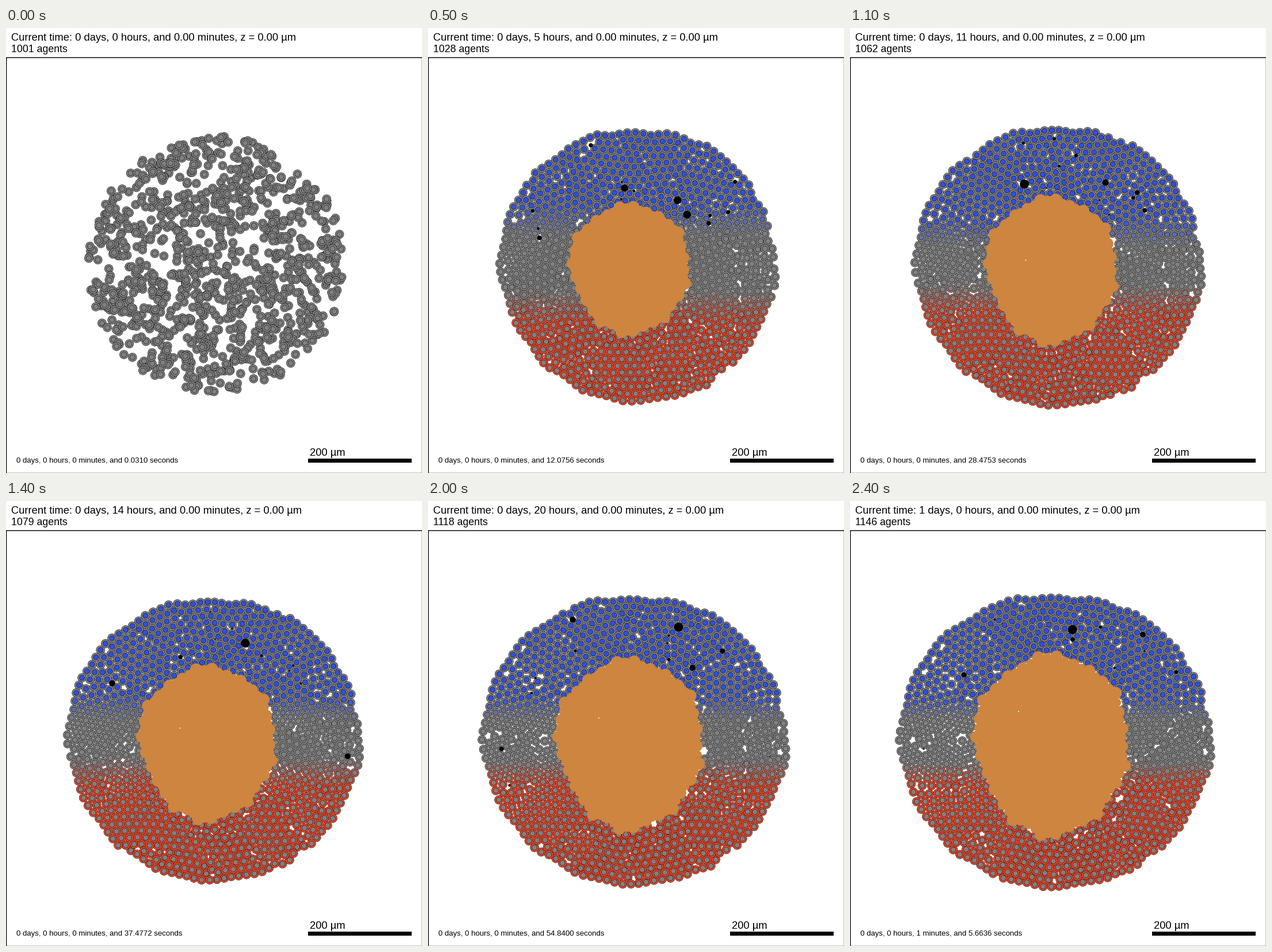
Write a matplotlib script that moves like this. It is 723 px wide and 774 px high and loops after 2500 ms.

```python
import numpy as np
import matplotlib.pyplot as plt
from matplotlib.animation import FuncAnimation
from matplotlib.collections import EllipseCollection
from matplotlib.patches import Polygon, Rectangle
from matplotlib.path import Path

W, H, DPI = 723, 774, 100
HOURS = 25
PX = 72 / DPI
CENTER = np.array([365, 412])
R_CELL, R_NUC = 7.5, 4.5
GREY, BLUE, RED = (np.array(c) / 255 for c in
                   [(128, 128, 128), (48, 78, 226), (232, 70, 42)])
ORANGE = "#cd853f"
rng = np.random.default_rng(11)

# Fixed irregularities of the rim and of the core's edge
JAGS = rng.normal(0, 4, 60)
LUMPS = 1 + rng.uniform(-0.05, 0.05, 29)

# Readouts: hour, agents, run time in seconds
KEYS = [0, 2, 8, 14, 18, 20, 24]
AGENTS = [1001, 1009, 1046, 1079, 1100, 1118, 1146]
SECONDS = [0.031, 4.678, 19.4733, 37.4772, 48.9793, 54.84, 65.6636]


def lerp(a, b, hour):
    """Steady growth from a at hour 2 to b at hour 24."""
    return a + (b - a) * (hour - 2) / 22


def place(r, angle):
    a = np.radians(angle)
    return CENTER + np.column_stack([r * np.cos(a), r * np.sin(a)])


def polar(p):
    d = p - CENTER
    return np.hypot(*d.T), np.degrees(np.arctan2(d[:, 1], d[:, 0])) % 360


def core_points(hour):
    """Egg-shaped core, a little broader at the top."""
    a = np.linspace(0, 2 * np.pi, len(LUMPS), endpoint=False)
    rx, ry = lerp(92, 128, hour), lerp(98, 150, hour)
    x = 351 + rx * LUMPS * np.cos(a) * (1 - 0.1 * np.sin(a))
    y = lerp(420, 427, hour) + ry * LUMPS * np.sin(a)
    return np.column_stack([x, y])


def walls(angle, hour):
    r, a = polar(core_points(hour))
    inner = np.interp(angle, a, r, period=360) + 11
    t = np.radians(angle)
    full = 259 + 5 * np.sin(t) - 9 * np.cos(t) + 8 * np.cos(2 * t)
    jag = np.interp(angle, np.linspace(0, 360, 60, endpoint=False),
                    JAGS, period=360)
    return inner, lerp(231, full, hour) + jag


def make_deaths(count=42):
    """Most cells die in the upper half."""
    hours = rng.uniform(-2, 24, count)
    angle = np.where(rng.random(count) < 0.9,
                     rng.uniform(185, 350, count), rng.uniform(0, 180, count))
    depth = rng.uniform(0.1, 0.95, count)
    spots = []
    for h, a, f in zip(hours, angle, depth):
        lo, hi = walls(np.array([a]), h)
        spots.append(place(lo + f * (hi - lo), a)[0])
    return hours, np.array(spots)


DEATH_HOURS, DEATH_SPOTS = make_deaths()


def dead_cells(hour):
    age = hour - DEATH_HOURS
    r = 8 * np.exp(-age / 4)
    on = (age >= 0) & (r > 1)
    return DEATH_SPOTS[on], r[on]


def relax(p, hour, rounds):
    """Push crowded cells apart between the core and the rim."""
    dots, dot_r = dead_cells(hour)
    n = len(p)
    for step in range(rounds):
        if step % 20 == 0:
            dx = p[:, None, 0] - p[None, :, 0]
            dy = p[:, None, 1] - p[None, :, 1]
            i, j = np.nonzero(np.triu(dx * dx + dy * dy < 484, 1))
        d = p[i] - p[j]
        dist = np.hypot(*d.T) + 1e-6
        push = d * (0.2 * np.clip(15.6 - dist, 0, None) / dist)[:, None]
        for k in (0, 1):
            p[:, k] += (np.bincount(i, push[:, k], n)
                        - np.bincount(j, push[:, k], n))
        for c, cr in zip(dots, dot_r):
            d = p - c
            dist = np.hypot(*d.T) + 1e-6
            p += d * (0.4 * np.clip(cr + 6 - dist, 0, None) / dist)[:, None]
        r, a = polar(p)
        p = place(np.clip(r, *walls(a, hour)), a)
    return p


def simulate():
    start = place(224 * np.sqrt(rng.random(1001)), 360 * rng.random(1001))
    p = start[~Path(core_points(2)).contains_points(start)]
    p = relax(p, 1, 250)
    frames = [start, p]
    for hour in range(2, HOURS):
        r, a = polar(p)
        lo, hi = walls(a, hour - 1)
        new_lo, new_hi = walls(a, hour)
        p = place(new_lo + (r - lo) / (hi - lo) * (new_hi - new_lo), a)
        parents = p[rng.integers(len(p), size=2)]
        p = np.vstack([p, parents + rng.normal(0, 2, (2, 2))])
        p = relax(p, hour, 50)
        frames.append(p)
    return frames


def circles(p, r, face, edge="none", z=2):
    d = np.broadcast_to(2 * np.asarray(r, float), len(p))
    ax.add_collection(EllipseCollection(
        d, d, np.zeros(len(p)), units="xy", offsets=p,
        offset_transform=ax.transData, facecolors=face, edgecolors=edge,
        linewidths=0.5 * PX, zorder=z), autolim=False)


def mix(base, tint, amount):
    return base + (tint - base) * np.clip(amount, 0, 1)[:, None]


def draw_cells(p, hour):
    """Blue nuclei spread from the top, red bodies from the bottom."""
    y = p[:, 1]
    fade = 58 - hour
    top = 346 - 64 * np.exp((2 - hour) / 6)
    bottom = 490 + 40 * np.exp((2 - hour) / 5)
    on = hour > 0
    face = np.empty((2 * len(p), 3))
    face[0::2] = mix(GREY, RED, on * (1 - (bottom - y) / fade))
    face[1::2] = mix(GREY, BLUE, on * (1 - (y - top) / fade))
    radii = np.tile([R_CELL, R_NUC], len(p))
    circles(np.repeat(p, 2, axis=0), radii, face, "black")


def draw_core(hour):
    edge = core_points(hour)
    between = (edge + np.roll(edge, -1, axis=0)) / 2
    ax.add_patch(Polygon(edge, fc=ORANGE, ec=ORANGE, lw=2, zorder=3))
    circles(edge, 10.5, ORANGE, z=3)
    circles(between, 7, ORANGE, z=3)
    gap = 1.8 - 0.4 * hour
    if gap > 0:
        mid = np.array([380, 399])
        a = np.arange(6) * 1.05 + 0.4
        ring = np.column_stack([np.cos(a), np.sin(a)])
        circles(mid[None], 25 * gap, "white", z=4)
        circles(mid + 22 * gap * ring, 9, ORANGE, z=5)
    if hour >= 8:
        speck = lerp(np.array([314, 430]), np.array([293, 366]), hour)
        circles(speck[None], 1, "white", z=5)


def label(x, y, size, text=""):
    return ax.text(x, y, text, family="Liberation Sans", size=size * PX,
                   va="baseline", zorder=9)


fig = plt.figure(figsize=(W / DPI, H / DPI), dpi=DPI, facecolor="white")
ax = fig.add_axes([0, 0, 1, 1])
ax.set(xlim=(0, W), ylim=(H, 0))
ax.axis("off")

border = Rectangle((0, 50.6), W, W, fc="none", ec="black", lw=1.45 * PX)
bar = Rectangle((525.2, 748.8), 180, 7, fc="black", ec="none")
for shape in (border, bar):
    ax.add_patch(shape)
clock = label(9, 21.7, 18.35)
agents = label(9, 41.6, 17.7)
runtime = label(18, 755.6, 13.3)
label(528.5, 744, 18.35, "200 µm")

cells = simulate()


def update(hour):
    for artist in list(ax.collections) + list(ax.patches):
        if artist not in (border, bar):
            artist.remove()
    draw_cells(cells[hour], hour)
    if hour:
        draw_core(hour)
        circles(*dead_cells(hour), "black", z=6)
    clock.set_text(f"Current time: {hour // 24} days, {hour % 24} hours, "
                   "and 0.00 minutes, z = 0.00 µm")
    agents.set_text(f"{np.interp(hour, KEYS, AGENTS):.0f} agents")
    secs = np.interp(hour, KEYS, SECONDS)
    runtime.set_text(f"0 days, 0 hours, {int(secs // 60)} minutes, "
                     f"and {secs % 60:.4f} seconds")


anim = FuncAnimation(fig, update, frames=HOURS, init_func=lambda: None,
                     interval=100, repeat=True, repeat_delay=0)
plt.show()
```
